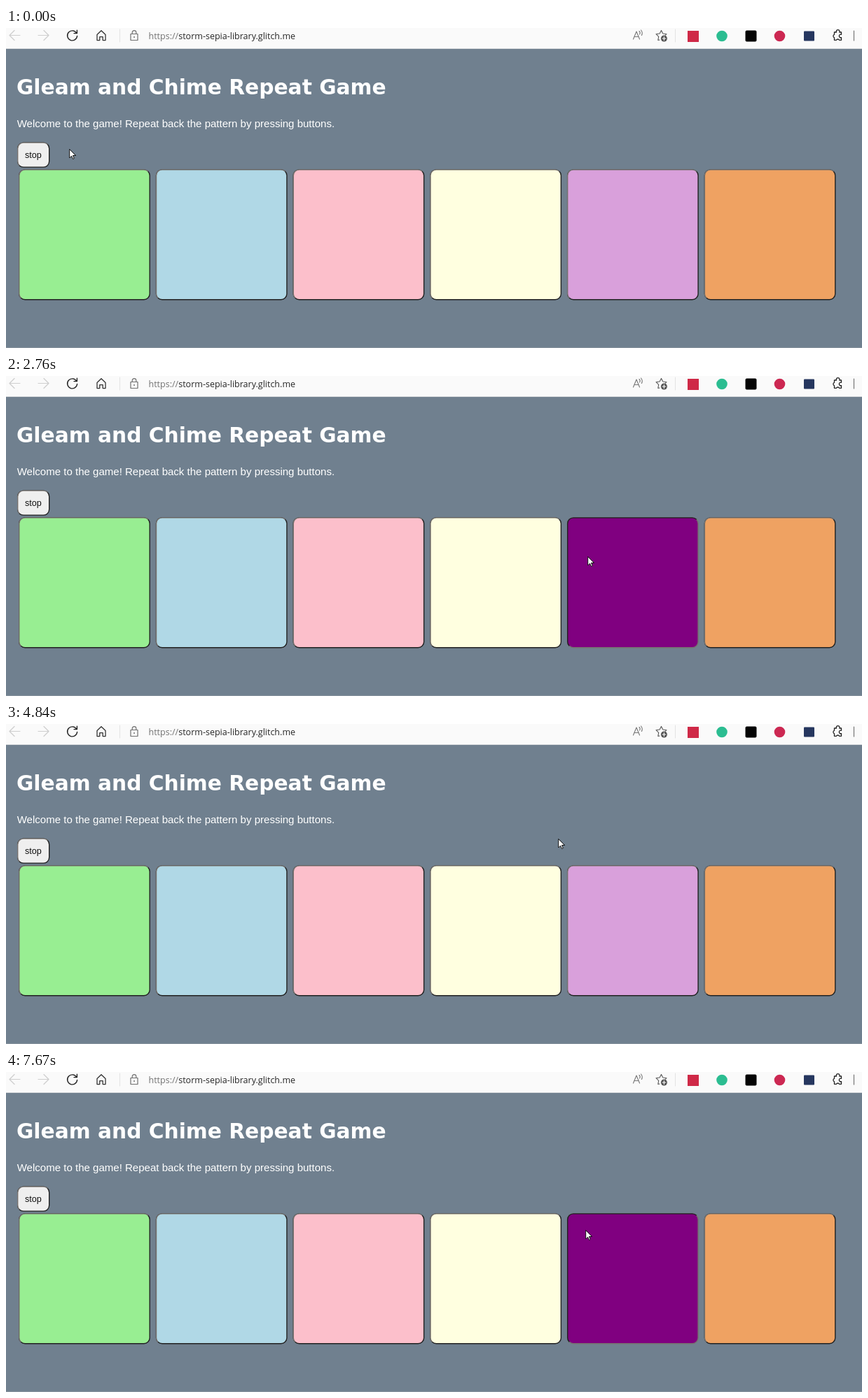
Animation, 1222 px wide and 458 px high, one loop 8000 ms. Source, as an HTML page with a canvas:

```html
<!DOCTYPE html>
<html lang="en">
<head>
<meta charset="utf-8">
<title>Memory game</title>
<style>
  html, body { margin: 0; width: 100%; height: 100%; overflow: hidden; background: #70808f; }
  canvas { display: block; width: 1222px; height: 458px; }
</style>
</head>
<body>
<canvas id="stage" width="1222" height="458"></canvas>
<script>
const ctx = document.getElementById('stage').getContext('2d');
const LOOP = 8000;
const EDGE_LIGHT = '#76726f', EDGE_DARK = '#212121';
const TILES = ['#98ee92', '#b0d8e6', '#fcbfcb', '#ffffe0', '#d9a0db', '#efa262'];

// start, end, tile, colour, pressed by the pointer
const LIT = [
  [700, 1600, 4, '#800080', false],
  [2760, 2880, 4, '#800080', true],
  [3880, 4840, 4, '#800080', false],
  [5270, 6130, 5, '#ffa500', false],
  [7670, 8000, 4, '#800080', true]
];

// time, x, y
const POINTER = [
  [0, 90, 173], [150, 104, 170], [270, 112, 168],
  [1890, 188, 166], [2040, 587, 152], [2190, 687, 157],
  [2340, 772, 206], [2460, 818, 251], [2610, 830, 258],
  [3030, 830, 239], [3180, 807, 198], [3330, 792, 169], [3450, 788, 164],
  [7250, 803, 187], [7400, 820, 212], [7520, 827, 226]
];

function line(color, width, d) {
  ctx.strokeStyle = color;
  ctx.lineWidth = width;
  ctx.stroke(new Path2D(d));
}

function text(str, x, y, font, color) {
  ctx.font = font;
  ctx.fillStyle = color;
  ctx.fillText(str, x, y);
}

function rounded(x, y, w, h, r, color) {
  ctx.fillStyle = color;
  ctx.beginPath();
  ctx.roundRect(x, y, w, h, r);
  ctx.fill();
}

function disc(x, y, r, color) {
  ctx.fillStyle = color;
  ctx.beginPath();
  ctx.arc(x, y, r, 0, 7);
  ctx.fill();
}

// x, y, w, h describe the face; the bevel lies outside it
function button(x, y, w, h, color, pressed) {
  const b = 1.4, l = x - b, t = y - b, r = x + w + b, d = y + h + b;
  const [upper, lower] = pressed ? [EDGE_DARK, EDGE_LIGHT] : [EDGE_LIGHT, EDGE_DARK];
  rounded(l, t, r - l, d - t, 9, lower);
  ctx.save();
  ctx.clip(new Path2D(`M${l - 1} ${t - 1}H${r + 1}L${r - 9} ${t + 9}L${l + 9} ${d - 9}L${l - 1} ${d + 1}Z`));
  rounded(l, t, r - l, d - t, 9, upper);
  ctx.restore();
  rounded(x, y, w, h, 7.6, color);
}

function toolbar() {
  ctx.fillStyle = '#fafafa';
  ctx.fillRect(0, 0, 1222, 29);
  ctx.fillStyle = '#d5d8db';
  ctx.fillRect(0, 29, 1222, 1);
  ctx.lineCap = ctx.lineJoin = 'round';

  line('#cfcfcf', 1.2, 'M20 10.5H5M12 3.5L5 10.5L12 17.5M46 10.5H61M54 3.5L61 10.5L54 17.5');
  line('#222', 1.4, 'M100.6 7.2A7 7 0 1 0 101.6 11.5M101.4 3.2V7.6H97');
  line('#333', 1.3, 'M130 9.5L136 3.8L142 9.5V17.6H138.2V12.6H133.8V17.6H130Z');
  line('#e4e4e4', 1, 'M162.5 2V20M955.5 2V20');
  line('#707070', 1.2, 'M178 8.5H188V17.5H178ZM180.2 8.5V6.5A2.8 2.8 0 0 1 185.8 6.5V8.5');
  disc(183, 13, 1, '#707070');

  const urlFont = '12.53px "Open Sans", "Noto Sans", sans-serif';
  text('https://', 203.5, 15.8, urlFont, '#737373');
  text('storm-sepia-library.glitch.me', 246.2, 15.8, urlFont, '#262626');

  line('#777', 1.1, 'M895.5 16L900 5L904.5 16M897 12.5H903M904 4.5Q906 6.5 904.6 9M906.5 3Q909.5 6.5 907.4 10.5');
  line('#555', 1.1, 'M933 17L930.8 17.5L931.7 12.3L928 8.7L933.1 8L935.5 3.4L937.8 8L943 8.7L941.3 10.3');
  disc(939.4, 15, 4.5, '#555');
  line('#fff', 1.1, 'M937 15H941.8M939.4 12.6V17.4');

  ctx.fillStyle = '#cf2947';
  ctx.fillRect(973, 4, 16, 16);
  disc(1022, 11.5, 7.8, '#2bbd91');
  rounded(1055.5, 3.5, 16, 16, 2, '#050505');
  disc(1104.5, 11.5, 7.8, '#cc2852');
  rounded(1139, 4.5, 15, 14, 1, '#26375f');
  line('#222', 1.3, 'M1182.5 6H1185.5A2.4 2.4 0 1 1 1189.8 6H1192.5V9.3A2.3 2.3 0 1 0 1192.5 13.6V17.3H1189.5A2.2 2.2 0 0 0 1185.5 17.3H1182.5V13.8A2.4 2.4 0 0 1 1182.5 9.3Z');
  line('#777', 1.2, 'M1210.5 4V18');
}

function pointer(x, y) {
  const arrow = new Path2D('M.7 .9V13L3.5 10.2L5.5 14.5L7.3 13.7L5.5 9.5H9.2Z');
  ctx.save();
  ctx.translate(x, y);
  ctx.lineJoin = 'miter';
  ctx.fillStyle = '#fff';
  ctx.fill(arrow);
  ctx.strokeStyle = '#111';
  ctx.lineWidth = 1;
  ctx.stroke(arrow);
  ctx.restore();
}

function draw(t) {
  ctx.fillStyle = '#70808f';
  ctx.fillRect(0, 0, 1222, 458);
  ctx.fillStyle = '#87929e';
  ctx.fillRect(0, 457, 1222, 1);
  toolbar();

  text('Gleam and Chime Repeat Game', 15, 95, 'bold 29.7px "DejaVu Sans", sans-serif', '#fff');
  text('Welcome to the game! Repeat back the pattern by pressing buttons.',
    15.7, 142, '15.04px "Liberation Sans", Arial, sans-serif', '#fff');
  button(17.4, 164.8, 43.6, 33.6, '#efefef', false);
  text('stop', 27, 185.5, '12.6px "Liberation Sans", Arial, sans-serif', '#111');

  const lit = LIT.find(([from, to]) => t >= from && t < to);
  TILES.forEach((color, i) => {
    const on = lit && lit[2] === i;
    button(19.5 + 195.72 * i, 203.6, 185, 184.4, on ? lit[3] : color, on && lit[4]);
  });

  const [, x, y] = POINTER.findLast(([from]) => t >= from);
  pointer(x, y);
}

function tick() {
  draw(performance.now() % LOOP);
  requestAnimationFrame(tick);
}
tick();
</script>
</body>
</html>
```
